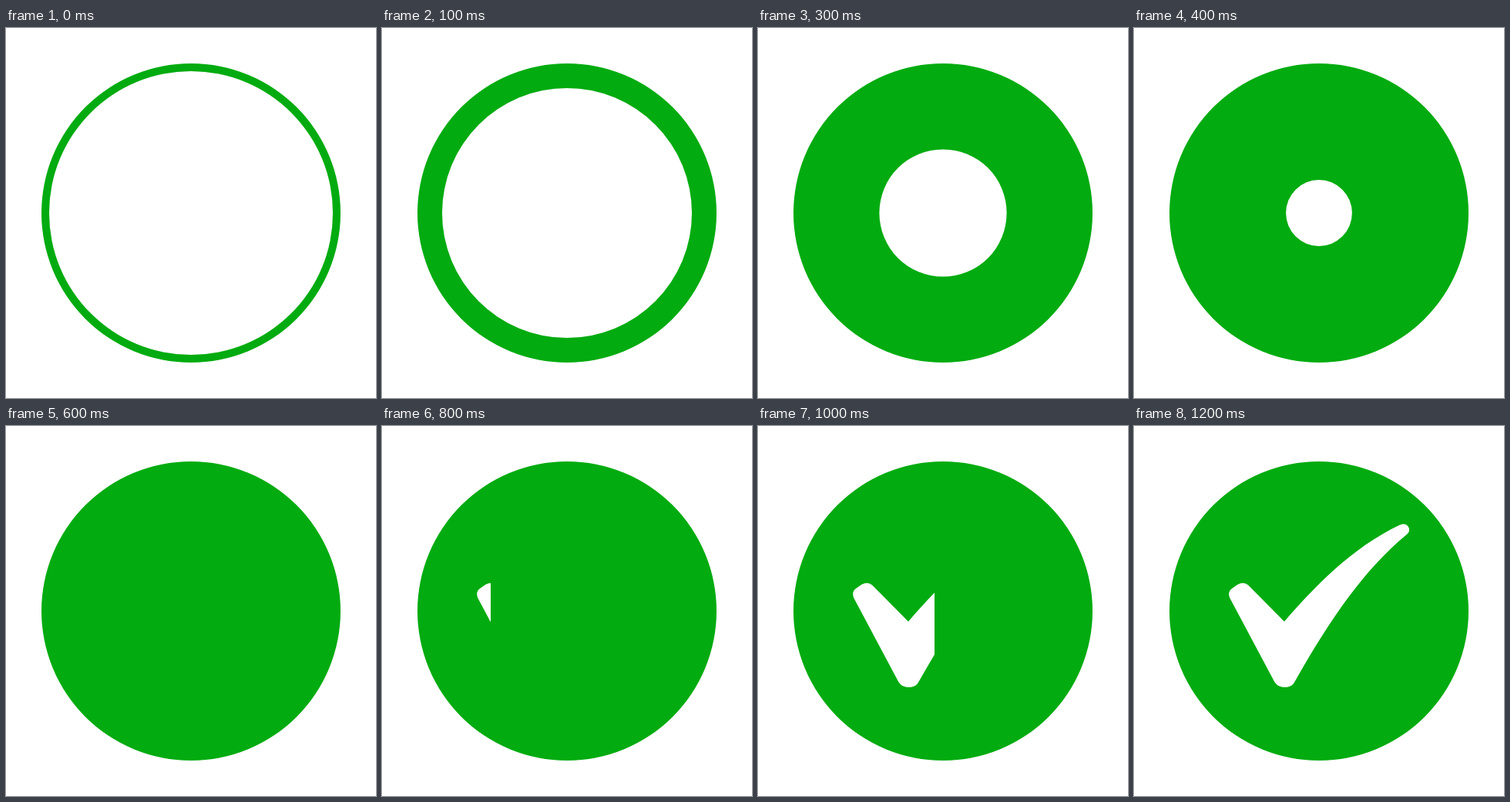
Animation, 480 px wide and 480 px high, one loop 1.3 s. Source, as an HTML page with a canvas:

```html
<!DOCTYPE html>
<html lang="en">
<head>
<meta charset="utf-8">
<title>Check mark</title>
<style>
html, body { margin: 0; width: 100%; height: 100%; overflow: hidden; background: #fff; }
canvas { display: block; width: 480px; height: 480px; }
</style>
</head>
<body>
<canvas id="stage" width="480" height="480"></canvas>
<script>
const ctx = document.getElementById('stage').getContext('2d');
const GREEN = '#02ab10';
const LOOP = 1300, STEP = 100;
const tick = new Path2D(
  'M124.5 223.5 C122 218 123 213.5 127.5 210.5 L133.5 206.3 ' +
  'C139 202.5 145 203 149.5 207.7 L195 253.7 ' +
  'C232 211 282 158 345 128.3 C350 126 354.5 127.5 356.3 131.5 ' +
  'C358 135.5 357 138 353.5 141 C298 187 255 250 209.5 330 ' +
  'C206.5 336 203 338.8 196 338.8 C188 338.8 184.5 336 181.5 330.5 Z');

function disc(r, color) {
  ctx.fillStyle = color;
  ctx.beginPath();
  ctx.arc(240, 240, r, 0, Math.PI * 2);
  ctx.fill();
}

// The hole closes at a steady speed, starting from the thin outline.
function holeRadius(t) {
  return Math.max(0, Math.min(184, 201.7 - 0.397 * t));
}

// The wipe runs left to right, then the whole mark is shown.
function wipeEdge(t) {
  return t >= 1200 ? 480 : 141 + 0.44 * (t - 800);
}

function draw(t) {
  ctx.fillStyle = '#fff';
  ctx.fillRect(0, 0, 480, 480);
  disc(194, GREEN);
  const hole = holeRadius(t);
  if (hole > 0) disc(hole, '#fff');
  if (t < 700) return;
  ctx.save();
  ctx.beginPath();
  ctx.rect(0, 0, wipeEdge(t), 480);
  ctx.clip();
  ctx.fillStyle = '#fff';
  ctx.fill(tick);
  ctx.restore();
}

const start = performance.now();
function loop() {
  const t = (performance.now() - start) % LOOP;
  draw(Math.floor(t / STEP) * STEP);
  requestAnimationFrame(loop);
}
loop();
</script>
</body>
</html>
```
